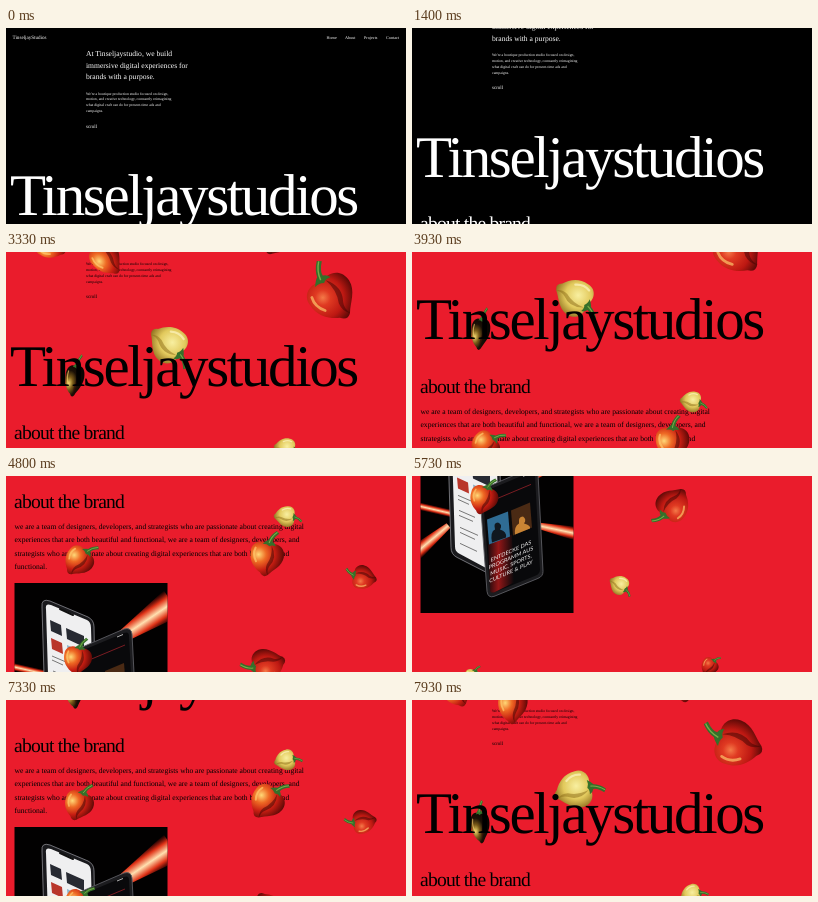
Animation, 400 px wide and 196 px high, one loop 8 s. Source, as an HTML page:

```html
<!DOCTYPE html>
<html lang="en">
<head>
<meta charset="utf-8">
<title>Studio landing page</title>
<style>
  html, body { margin: 0; width: 100%; height: 100%; overflow: hidden; background: #000; }
  svg { display: block; width: 100vw; height: 100vh; }
  text { font-family: "Liberation Serif", "Times New Roman", serif; text-rendering: geometricPrecision; white-space: pre; }
  .phone text { font-family: Lato, "Open Sans", sans-serif; }
</style>
</head>
<body>
<svg id="stage" viewBox="0 0 400 196" xmlns="http://www.w3.org/2000/svg">
  <defs>
    <radialGradient id="red" cx=".32" cy=".35" r=".75">
      <stop offset="0" stop-color="#f47a48"/><stop offset=".22" stop-color="#e03a22"/>
      <stop offset=".6" stop-color="#bd1812"/><stop offset="1" stop-color="#3d0503"/>
    </radialGradient>
    <radialGradient id="yellow" cx=".4" cy=".38" r=".7">
      <stop offset="0" stop-color="#f8efa0"/><stop offset=".5" stop-color="#e2c95c"/>
      <stop offset="1" stop-color="#7d5c12"/>
    </radialGradient>
    <radialGradient id="orange" cx=".25" cy=".4" r=".8">
      <stop offset="0" stop-color="#ffd877"/><stop offset=".28" stop-color="#ee6a24"/>
      <stop offset=".6" stop-color="#c61d12"/><stop offset="1" stop-color="#4a0604"/>
    </radialGradient>
    <radialGradient id="dark" cx=".25" cy=".6" r=".7">
      <stop offset="0" stop-color="#ecd468"/><stop offset=".3" stop-color="#7a5a18"/>
      <stop offset=".6" stop-color="#1a1006"/><stop offset="1" stop-color="#0a0502"/>
    </radialGradient>
    <linearGradient id="beam" x1="0" x2="0" y1="0" y2="1">
      <stop offset="0" stop-color="#c01008" stop-opacity="0"/><stop offset=".25" stop-color="#e03418"/>
      <stop offset=".5" stop-color="#ffe0b0"/><stop offset=".75" stop-color="#e03418"/>
      <stop offset="1" stop-color="#c01008" stop-opacity="0"/>
    </linearGradient>
    <linearGradient id="glow" x1="0" x2="1" y1="0" y2="0">
      <stop offset="0" stop-color="#d01c1c" stop-opacity=".1"/><stop offset=".4" stop-color="#d01c1c" stop-opacity=".7"/>
      <stop offset="1" stop-color="#d01c1c" stop-opacity="0"/>
    </linearGradient>
    <clipPath id="frame"><rect x="8.5" y="-8" width="153" height="190.5"/></clipPath>
  </defs>

  <rect width="400" height="196" fill="#000"/>
  <rect id="tint" width="400" height="196" fill="#ea1c2c"/>
  <circle id="disc" cx="165" cy="122" fill="#ea1c2c"/>

  <g id="page">
    <g id="copy"></g>
    <g class="phone" transform="translate(0 324)" clip-path="url(#frame)">
      <rect x="8" y="-8" width="154" height="191" fill="#020101"/>
      <g fill="url(#beam)">
        <path d="M0 -4 L75 -15 V15 L0 4Z" transform="translate(104 54) rotate(-34)"/>
        <path d="M0 -4 L40 -4 V4 L0 4Z" transform="translate(4 75) rotate(13)"/>
        <path d="M0 -8 L45 -3 V3 L0 8Z" transform="translate(2 124) rotate(-40)"/>
        <path d="M0 -3 L40 -7 V7 L0 3Z" transform="translate(125 95) rotate(12)"/>
      </g>
      <!-- light phone -->
      <path d="M36 16 Q35 7 44 10 L82 26 Q88 29 88 36 L90 150 L45 127 Q39 124 39 117Z" fill="#19191c" stroke="#8a8a90" stroke-width=".8"/>
      <path d="M40 18 Q39 12 45 14 L81 29 Q85 31 85 37 L88 145 L47 123 Q43 121 43 116Z" fill="#efeff0"/>
      <path d="M54 18 L67 24" stroke="#111" stroke-width="2" stroke-linecap="round"/>
      <path d="M44 29 L55 34 56 45 45 40Z M60 37 L78 45 78 56 61 48Z" fill="#272a32"/>
      <path d="M45 47 L56 52 57 63 46 58Z" fill="#b9352a"/>
      <path d="M61 54 L79 62 79 73 62 65Z" fill="#8eb4cb"/>
      <path d="M46 65 L60 71 M46 69 L57 74 M47 80 L63 87 M47 85 L61 91 M48 97 L66 105 M48 102 L63 109 M48 113 L65 121" stroke="#777" stroke-width="1"/>
      <!-- dark phone -->
      <path d="M68 66 Q68 60 74 57 L118 38 Q125 36 126 43 L131 141 Q131 146 126 148 L82 166 Q76 168 75 161Z" fill="#1c1c1f" stroke="#5d5d63" stroke-width=".9"/>
      <path d="M71 67 Q71 62 75 60 L118 42 Q123 40 123 45 L128 139 Q128 143 124 145 L82 162 Q78 163 78 159Z" fill="#09090b"/>
      <path d="M76 114 L100 104 102 152 82 162 Q78 163 78 159Z" fill="url(#glow)"/>
      <path d="M111 46 L117 43.500" stroke="#ddd" stroke-width=".8"/>
      <path d="M76 72 L119 54" stroke="#7a1c22" stroke-width="1"/>
      <path d="M75 89 L96 81 98 106 77 114Z" fill="#2f6c94"/>
      <path d="M80 112 Q78 101 83 99 Q81 92 86 92 Q91 94 88 99 Q95 101 94 107Z" fill="#101820"/>
      <path d="M99 80 L118 72 120 97 101 105Z" fill="#4a2a14"/>
      <path d="M103 104 Q102 96 107 93 Q106 86 111 86 Q115 89 112 93 Q119 95 118 98Z" fill="#c98434"/>
      <g id="slogan" fill="#f4f4f4" text-anchor="middle" transform="translate(99 121.5) skewY(-24)"></g>
    </g>
    <g id="peppers"></g>
    <g id="title"></g>
  </g>
</svg>
<script>
const LOOP = 8000, STEP = 1000 / 15;
const $ = id => document.getElementById(id);
const clamp = v => Math.max(0, Math.min(1, v));

function add(parent, tag, attrs, text) {
  const el = document.createElementNS("http://www.w3.org/2000/svg", tag);
  for (const k in attrs) el.setAttribute(k, attrs[k]);
  if (text) el.textContent = text;
  parent.append(el);
  return el;
}

function lines(parent, x, y, size, gap, rows, extra) {
  rows.forEach((row, i) => add(parent, "text", { x, y: y + i * gap, "font-size": size, ...extra }, row));
}

const copy = $("copy");
lines(copy, 6.5, 11.2, 5.1, 0, ["TinseljayStudios"]);
[["Home", 320.5], ["About", 339], ["Projects", 358], ["Contact", 380]]
  .forEach(([label, x]) => lines(copy, x, 10.8, 4.2, 0, [label]));
lines(copy, 80, 28.3, 7.6, 11.35, [
  "At Tinseljaystudio, we build",
  "immersive digital experiences for",
  "brands with a purpose."
]);
lines(copy, 80, 66.6, 3.8, 5.85, [
  "We're a boutique production studio focused on design,",
  "motion, and creative technology, constantly reimagining",
  "what digital craft can do for present-time ads and",
  "campaigns."
]);
lines(copy, 80, 99.6, 5, 0, ["scroll"]);
lines(copy, 8, 240.5, 19.6, 0, ["about the brand"], { "letter-spacing": "-.04em" });
lines(copy, 8.5, 261.5, 7.57, 13.6, [
  "we are a team of designers, developers, and strategists who are passionate about creating digital",
  "experiences that are both beautiful and functional, we are a team of designers, developers, and",
  "strategists who are passionate about creating digital experiences that are both beautiful and",
  "functional."
]);
lines($("title"), 4, 187.3, 59, 0, ["Tinseljaystudios"], { "letter-spacing": "-.04em" });
lines($("slogan"), 0, 1, 5.5, 6.8, ["ENTDECKE DAS", "PROGRAMM AUS", "MUSIC, SPORTS,", "CULTURE & PLAY"]);

// x, y, size, skin, angle at 4 s, degrees per second, width ratio
const peppers = [
  [326, 99, 1.4, "red", -38, -8],
  [162, 144, 1.12, "yellow", 125, -12],
  [68, 181, .95, "dark", 8, -3, .6],
  [279, 249, .63, "yellow", 100, -6],
  [72, 294, .88, "orange", 50, -8],
  [260, 291, 1.02, "orange", 2, 12],
  [358, 311, .72, "red", -69, -8],
  [262, 398, 1, "red", -70, -40],
  [71, 393, .85, "orange", 5, 9],
  [207, 478, .58, "yellow", 160, -20],
  [297, 560, .52, "red", 20, 12],
  [60, 571, .5, "yellow", 40, -10],
  [100, 60, 1.05, "orange", -30, 9, .85],
  [45, 46, .9, "orange", -50, 8],
  [270, 41, .9, "red", 30, -10]
].map(([x, y, size, skin, angle, spin, ratio = 1]) => {
  const g = add($("peppers"), "g", {});
  const body = add(g, "g", { transform: `scale(${size * ratio} ${size})` });
  const pale = skin === "yellow";
  add(body, "path", { d: "M0 -13C7 -18 17 -14 17 -4C17 5 9 10 5 16Q1 20 -3 15C-9 12 -16 6 -16 -4C-17 -13 -7 -18 0 -13Z", fill: `url(#${skin})` });
  add(body, "path", { d: "M3 -13Q11 -3 5 7Q3 11 5 16Q1 12 2 6Q6 -3 3 -13Z", fill: pale ? "#8c6b18" : "#3a0403", opacity: .5 });
  add(body, "path", { d: "M-12 -8Q-14 -1 -9 5", fill: "none", stroke: pale ? "#fff8c8" : "#ffcf70", "stroke-width": 2, "stroke-linecap": "round", opacity: .65 });
  add(body, "path", { d: "M-6 -13Q-3 -17 -1 -18Q0 -23 5 -28L8 -26Q3 -21 3 -17Q6 -16 7 -13Q3 -14 1 -12Q-2 -14 -6 -13Z", fill: "#35702a" });
  add(body, "path", { d: "M0 -15Q1 -22 6 -27", fill: "none", stroke: "#79ac48", "stroke-width": 1 });
  return t => g.setAttribute("transform", `translate(${x} ${y}) rotate(${angle + spin * (t / 1000 - 4)})`);
});

// time, scroll offset, speed in px/s
const path = [
  [1000, 0, 0], [2070, 51, 0], [3200, 51, 0], [3930, 99.5, 105],
  [4800, 209, 155], [5730, 369.3, 95], [6100, 389, 0],
  [6730, 324.6, -190], [7930, 55, -190], [8000, 42, -160]
];

function scrollAt(t) {
  if (t <= path[0][0]) return 0;
  const i = path.findIndex(k => k[0] >= t);
  const [t0, a, va] = path[i - 1], [t1, b, vb] = path[i];
  const d = t1 - t0, u = (t - t0) / d, s = d / 1000;
  if (i === 1) return b * (1 - (1 - u) ** 3);
  const u2 = u * u, u3 = u2 * u;
  return a * (2 * u3 - 3 * u2 + 1) + b * (3 * u2 - 2 * u3)
    + s * va * (u3 - 2 * u2 + u) + s * vb * (u3 - u2);
}

function draw(t) {
  const p = clamp((t - 2467) / 863);
  const ink = Math.round(255 * (1 - clamp((p - .48) / .45)));
  const color = `rgb(${ink},${ink},${ink})`;
  $("disc").setAttribute("r", 268 * p ** 2.54);
  $("tint").setAttribute("opacity", p ** 3.8);
  $("peppers").setAttribute("opacity", p ** 1.6);
  copy.setAttribute("fill", color);
  $("title").setAttribute("fill", color);
  $("page").setAttribute("transform", `translate(0 ${-scrollAt(t)})`);
  peppers.forEach(turn => turn(t));
}

const start = performance.now();
function tick() {
  const t = (performance.now() - start) % LOOP;
  draw(Math.floor((t + 5) / STEP) * STEP % LOOP);
  requestAnimationFrame(tick);
}
tick();
</script>
</body>
</html>
```
